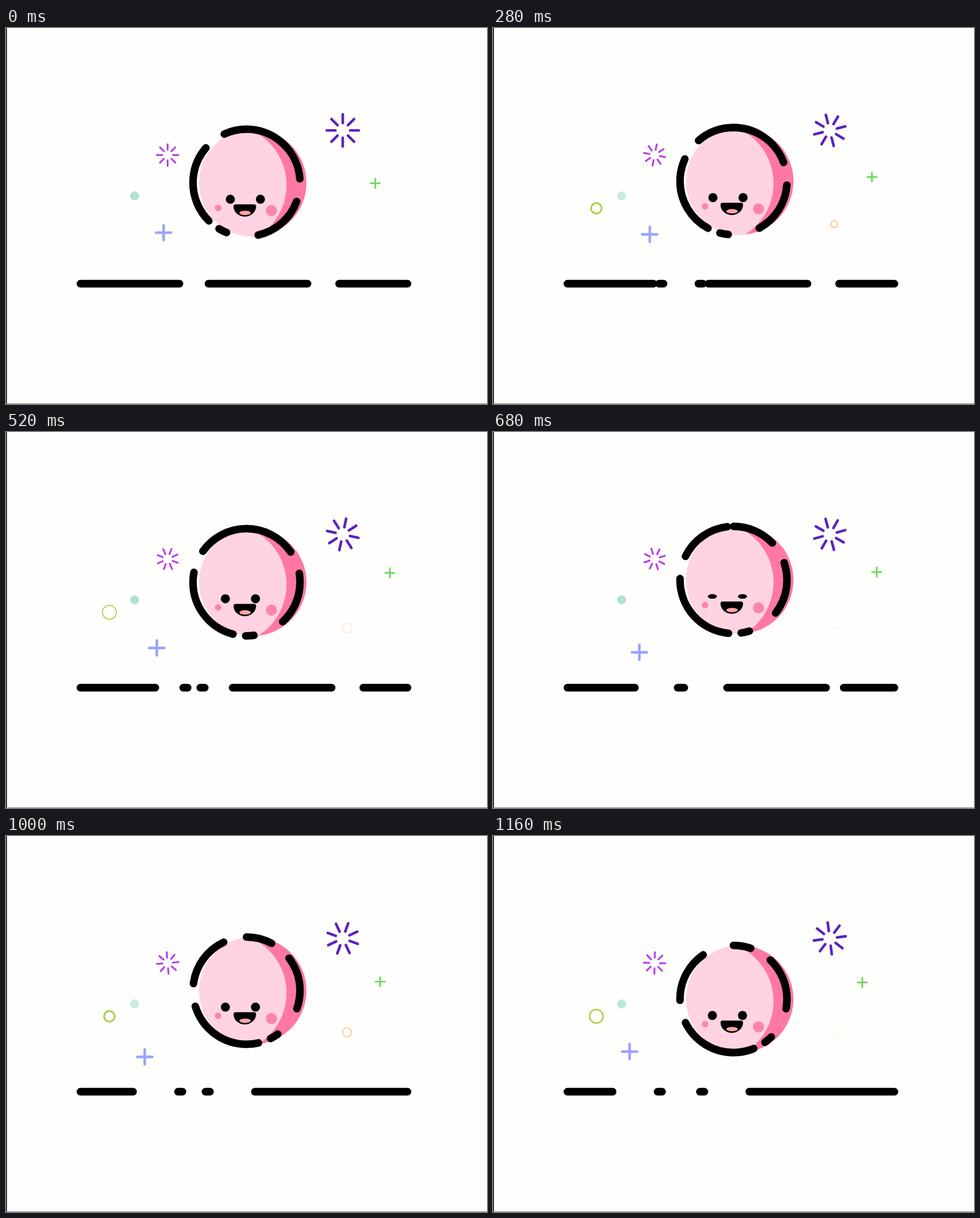
Write an HTML page that moves like this. It is 847 px wide and 661 px high and loops after 1.2 s.

```html
<!DOCTYPE html>
<html lang="en">
<head>
<meta charset="utf-8">
<title>Bouncing ball</title>
<style>
  html, body { margin: 0; width: 100%; height: 100%; overflow: hidden; background: #fefefc; }
  svg { display: block; width: 100%; height: 100%; }
  .line { fill: none; stroke-linecap: round; }
</style>
</head>
<body>
<svg viewBox="0 0 847 661" preserveAspectRatio="none">
  <defs>
    <clipPath id="disc"><circle cx="434.8" cy="0" r="94.3"/></clipPath>
  </defs>
  <rect width="847" height="661" fill="#fefefc"/>
  <rect width="1.5" height="661" fill="#000"/>
  <rect y="660" width="847" height="1" fill="#777"/>

  <path id="burstA" class="line" stroke="#b83ee8" stroke-width="3.2"/>
  <path id="burstB" class="line" stroke="#5a22bd" stroke-width="4.6"/>
  <path id="plusA" class="line" stroke="#9ca3ff" stroke-width="4.6" d="M-13.2 0H13.2M0-13.2V13.2"/>
  <path id="plusB" class="line" stroke="#6fd95f" stroke-width="3" d="M-8.2 0H8.2M0-8.2V8.2"/>
  <circle id="dot" cx="226.5" cy="295" r="7.8" fill="#aee3cd"/>
  <circle id="ringA" class="line" cx="182" cy="317" stroke="#a4d146"/>
  <circle id="ringB" class="line" cx="600.7" cy="345" stroke="#ffbf8c" stroke-width="1.8"/>

  <path id="ground" class="line" stroke="#000" stroke-width="13.3"/>

  <g id="ball">
    <g clip-path="url(#disc)">
      <rect x="340" y="-95" width="190" height="190" fill="#ff78a3"/>
      <circle cx="388" cy="4" r="106" fill="#ffd3e2"/>
    </g>
    <path id="outline" class="line" stroke="#000" stroke-width="13.3" pathLength="360"
      stroke-dasharray="86 24.7 57 34.5 9 13.8" d="M423.5-94.2A94.2 94.2 0 0 1 423.5 94.2A94.2 94.2 0 0 1 423.5-94.2"/>
    <circle cx="373.5" cy="44.3" r="5.7" fill="#ff84ad"/>
    <circle cx="467.5" cy="49" r="9.8" fill="#ff84ad"/>
    <ellipse id="eyeL" cy="29" rx="8" fill="#000"/>
    <ellipse id="eyeR" cy="29" rx="8" fill="#000"/>
    <path d="M404.5 38H436.5Q440.6 38 440.4 42C440 52 431 59.5 420.5 59.5S401 52 400.6 42Q400.4 38 404.5 38Z" fill="#000"/>
    <ellipse cx="421" cy="53" rx="10" ry="3.9" fill="#ffa5a3"/>
  </g>
</svg>
<script>
const LOOP = 1200, STEP = 40;
const { PI, sin, cos, min, max, abs } = Math;
const $ = id => document.getElementById(id);
const set = (id, attrs) => {
  for (const k in attrs) $(id).setAttribute(k, attrs[k]);
};
const clamp = (v, lo, hi) => min(hi, max(lo, v));
const part = (t, from, to) => clamp((t - from) / (to - from), 0, 1);
const easeOut = p => sin(p * PI / 2);
const easeInOut = p => (1 - cos(p * PI)) / 2;
const bezier = (a, b, c, d, p) => {
  const q = 1 - p;
  return a * q * q * q + 3 * b * q * q * p + 3 * c * q * p * p + d * p * p * p;
};
const move = (id, x, y) => set(id, { transform: `translate(${x} ${y})` });

// The dashes run right; their mirror image runs left through them.
const DASHES = [[-186, -11], [269.5, 277.5], [356.5, 531], [586.5, 900]];
const MIRROR = 662;

function ground(t) {
  const line = (a, b) => `M${clamp(a, 131, 707)} 449.5H${clamp(b, 131, 707)}`;
  const s = .0817 * t;
  return DASHES.map(([a, b]) =>
    line(a + s, b + s) + line(MIRROR - b - s, MIRROR - a - s)).join("");
}

function burst(x, y, inner, outer, angle) {
  let d = "";
  for (let i = 0; i < 8; i++) {
    const a = angle * PI / 180 + i * PI / 4, c = sin(a), s = -cos(a);
    d += `M${x + c * inner} ${y + s * inner}L${x + c * outer} ${y + s * outer}`;
  }
  return d;
}

function ballY(t) {
  const top = 720;
  return t < top
    ? 259 + 13.2 * sin(1.45 * (1 - t / top))
    : 259 + 25 * (1 - cos(.0038 * (t - top)));
}

function drawBall(t) {
  move("ball", 0, ballY(t));
  set("outline", { "stroke-dashoffset": .3 + .0577 * t });
  const look = 8.7 * (1 - easeInOut(part(t, 0, 360)));
  const ry = 4 + 4 * min(1, abs(t - 680) / 80);
  set("eyeL", { cx: 386.3 + look, ry });
  set("eyeR", { cx: 439.3 + look, ry });
}

function drawPluses(t) {
  const p = part(t, 240, 1160);
  move("plusA", bezier(277.5, 267, 245, 240.5, p), bezier(359.7, 384, 404.5, 379, p));

  const out = part(t, 0, 650), back = part(t, 650, 1160);
  move("plusB", 650.3 + 27 * (easeOut(out) - back),
    273 - 28 * easeInOut(out) + 12.6 * easeOut(back));
}

function drawRings(t) {
  const a = t % 720, b = (t + 540) % 600;
  set("ringA", {
    r: 12.3 * easeOut(part(a, 0, 520)),
    "stroke-width": 3.1 * sin(PI * part(a, 0, 640))
  });
  set("ringB", {
    r: 8.6 * easeOut(part(b, 0, 460)),
    opacity: min(part(b, 0, 40), part(b, 540, 320))
  });
}

function draw(t) {
  drawBall(t);
  drawPluses(t);
  drawRings(t);
  set("ground", { d: ground(t) });
  set("burstA", { d: burst(284.6, 223.3, 9.3, 19, .04 * t) });
  set("burstB", { d: burst(593, 180, 12.9, 28.2, .11 * t) });
  set("dot", { opacity: 1 - .33 * max(0, cos(2 * PI * (t - 300) / 740)) });
}

function tick() {
  draw(Math.floor(performance.now() % LOOP / STEP) * STEP);
  requestAnimationFrame(tick);
}
tick();
</script>
</body>
</html>
```
